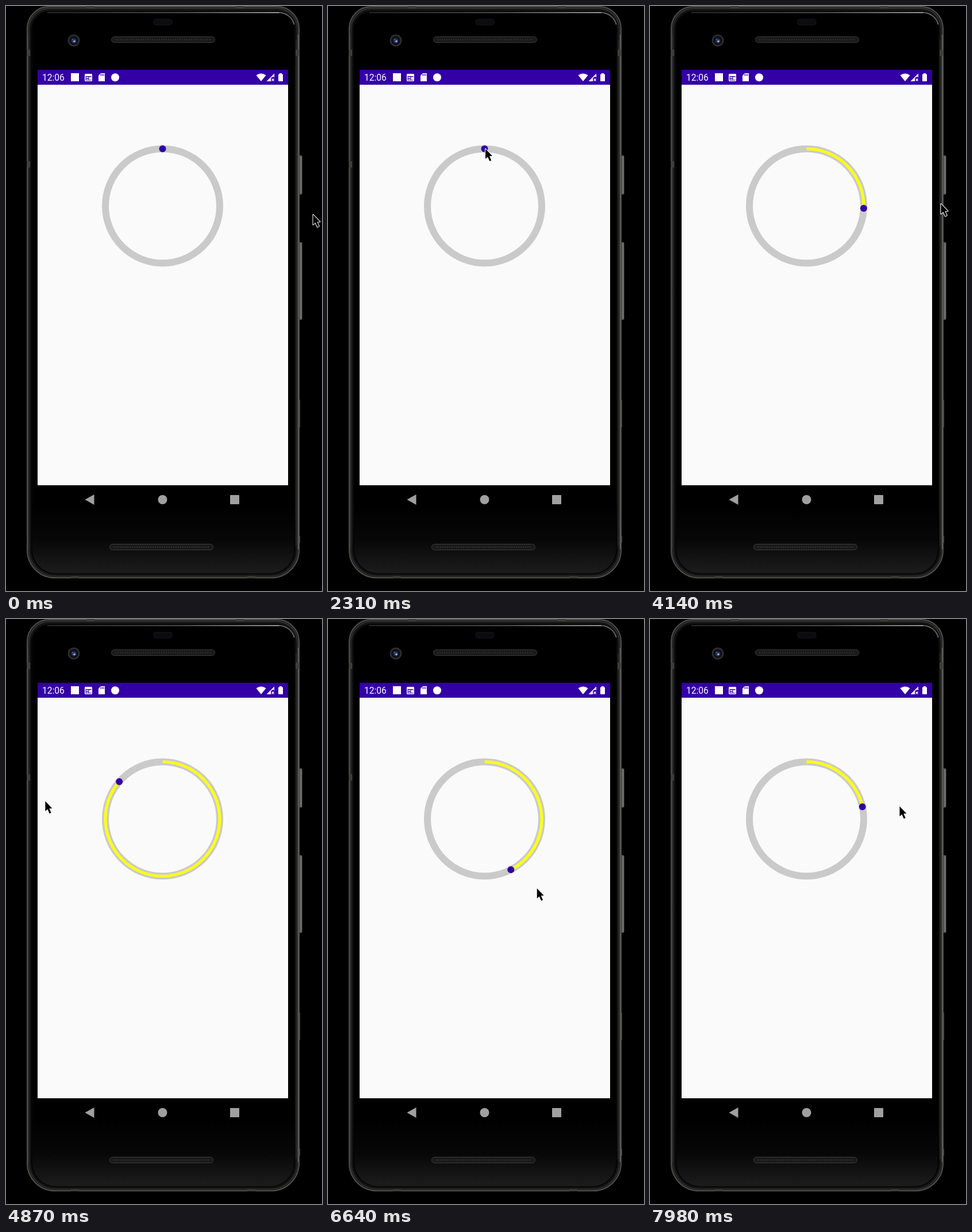
These frames come from a looping animation (550x1018 px, 8 s). An HTML page with a canvas:

```html
<!DOCTYPE html>
<html lang="en">
<head>
<meta charset="utf-8">
<title>Circular slider</title>
<style>
  html, body { margin: 0; width: 100%; height: 100%; overflow: hidden; background: #000; }
  canvas { display: block; }
</style>
</head>
<body>
<canvas id="stage" width="550" height="1018"></canvas>
<script>
const stage = document.getElementById('stage');
const backdrop = document.createElement('canvas');
backdrop.width = stage.width;
backdrop.height = stage.height;

const LOOP = 8000, LAG = 80, DRAG_START = 2350;
const RING = { x: 272.5, y: 348, r: 99.5 };
const PURPLE = '#3300a6', WHITE = '#fff';
const rad = deg => (deg - 90) * Math.PI / 180;

// Pointer before the drag: time, x, y
const approach = [
  [0, 534, 363], [220, 532, 362], [500, 440, 326], [840, 330, 284],
  [1440, 282, 260], [1800, 276, 252], [2310, 273.5, 248.5], [2350, 273.5, 248.5]
];
// Pointer during the drag: time, unwrapped clockwise degrees, distance from ring centre
const drag = [
  [2350, 0, 99.5], [2650, 88, 116], [3000, 213, 130], [3370, 325.5, 138.4],
  [3920, 445, 237], [4250, 440, 225], [4600, 380, 195], [4870, 279, 207],
  [5300, 112, 200], [5800, -40, 180], [6250, -160, 165], [6640, -216.8, 151],
  [7100, -262, 222], [7550, -298, 195], [7980, -277.8, 163], [8060, -273, 163]
];

// Smooth curve through timed pairs of values
function sample(keys, t) {
  const last = keys.length - 1;
  if (t <= keys[0][0]) return keys[0].slice(1);
  if (t >= keys[last][0]) return keys[last].slice(1);
  const i = keys.findIndex(k => k[0] > t) - 1;
  const a = keys[i], b = keys[i + 1], span = b[0] - a[0], u = (t - a[0]) / span;
  const before = keys[Math.max(0, i - 1)], after = keys[Math.min(last, i + 2)];
  return [1, 2].map(c => {
    const va = (b[c] - before[c]) / (b[0] - before[0]) * span;
    const vb = (after[c] - a[c]) / (after[0] - a[0]) * span;
    const d = b[c] - a[c];
    return a[c] + u * (va + u * (3 * d - 2 * va - vb + u * (va + vb - 2 * d)));
  });
}

function painter(canvas) {
  const ctx = canvas.getContext('2d');
  return {
    ctx,
    rect(x, y, w, h, fill) { ctx.fillStyle = fill; ctx.fillRect(x, y, w, h); },
    round(x, y, w, h, r, fill, line, width = 1) {
      ctx.beginPath();
      ctx.roundRect(x, y, w, h, r);
      if (fill) { ctx.fillStyle = fill; ctx.fill(); }
      if (line) { ctx.strokeStyle = line; ctx.lineWidth = width; ctx.stroke(); }
    },
    disc(x, y, r, fill) {
      ctx.fillStyle = fill;
      ctx.beginPath();
      ctx.arc(x, y, r, 0, 2 * Math.PI);
      ctx.fill();
    },
    poly(points, fill) {
      ctx.beginPath();
      points.forEach(p => ctx.lineTo(p[0], p[1]));
      ctx.closePath();
      if (fill) { ctx.fillStyle = fill; ctx.fill(); }
    },
    line(x1, y1, x2, y2, color, width = 1) {
      ctx.strokeStyle = color;
      ctx.lineWidth = width;
      ctx.beginPath();
      ctx.moveTo(x1, y1);
      ctx.lineTo(x2, y2);
      ctx.stroke();
    },
    gradient(x1, y1, x2, y2, stops) {
      const g = ctx.createLinearGradient(x1, y1, x2, y2);
      stops.forEach(s => g.addColorStop(s[0], s[1]));
      return g;
    }
  };
}

function drawPhone(p) {
  p.rect(0, 0, 550, 1018, '#000');
  [[260, 68], [411, 135]].forEach(([y, h]) => {
    p.round(508, y, 7.5, h, 2, '#5a5a56');
    p.line(513.5, y + 2, 513.5, y + h - 2, '#8b8b87');
  });
  [[685, 48], [922, 12]].forEach(([y, h]) => p.rect(510, y, 2, h, '#44443e'));

  const corners = [38, 38, 48, 48];
  p.round(37, 1, 473, 994, corners, '#1b1b1b', '#51514b', 2);
  p.round(40, 4, 467, 988, [36, 36, 46, 46], null, '#30302e', 2);
  p.round(42, 7, 463, 983, [34, 34, 44, 44], '#050505', '#141416', 3);
  p.round(46, 11, 455, 976, [30, 30, 41, 41],
    p.gradient(0, 870, 0, 988, [[0, '#000'], [0.5, '#070707'], [1, '#1d1d1d']]));
  p.line(72, 11.5, 476, 11.5, p.gradient(72, 0, 476, 0, [[0, '#333'], [0.6, '#666'], [1, '#c8c8c8']]), 1.5);
  p.ctx.strokeStyle = '#777';
  p.ctx.beginPath();
  p.ctx.arc(475, 39, 27.5, -Math.PI / 2, -0.25);
  p.ctx.stroke();
  p.line(505, 60, 505, 940, '#34343a');
  p.line(508.5, 50, 508.5, 945, '#60605b');
  p.line(38, 50, 38, 945, '#42423e');

  // Antenna seams
  [[36, 76], [36, 270], [504, 76]].forEach(([x, y]) => p.rect(x, y, 6, 11, '#3e3e3b'));
  [[140, 0], [400, 0], [113, 992], [420, 992]].forEach(([x, y]) => p.rect(x, y, 14, 4, '#3b3b35'));

  p.round(257, 23, 32, 10, 4, '#0b0b10', '#17171c');
  p.round(183.5, 53.5, 180, 10, 5, '#191919', '#3d3d3d');
  p.round(180.5, 936.5, 180, 10, 5, '#191919', '#3d3d3d');
  for (let x = 190; x < 358; x += 4) {
    p.rect(x, 57, 2, 3, '#2b2b2b');
    p.rect(x - 3, 940, 2, 3, '#2b2b2b');
  }
  p.disc(118, 60, 10.5, '#303033');
  p.disc(118, 60, 8, '#11111a');
  p.disc(118, 60.5, 4, '#293664');
  p.disc(119, 61.5, 1.8, '#92a9e0');
  p.disc(115.5, 58, 1, '#667');
}

function drawScreen(p) {
  const { ctx } = p;
  p.rect(55, 111, 436, 26, PURPLE);
  p.rect(55, 137, 436, 697, '#fafafa');

  ctx.fillStyle = WHITE;
  ctx.font = '15.6px Roboto, sans-serif';
  ctx.fillText('12:06', 63, 130);

  p.rect(113, 117, 14, 14, WHITE);
  p.round(137, 118, 13, 13, 1.5, WHITE);
  p.rect(138.5, 122, 10, 7.5, PURPLE);
  p.rect(139.5, 123.5, 4, 2, WHITE);
  p.rect(144.5, 123.5, 4, 5, WHITE);
  p.rect(139.5, 127, 4, 1.5, WHITE);
  p.poly([[165, 117], [172, 117], [172, 131], [161, 131], [161, 121]], WHITE);
  [165, 167.5, 170].forEach(x => p.rect(x - 0.7, 118.5, 1.3, 3, PURPLE));
  p.disc(190, 124.2, 7, WHITE);

  // Wi-Fi, mobile signal, battery
  ctx.fillStyle = WHITE;
  ctx.beginPath();
  ctx.moveTo(444, 131);
  ctx.lineTo(435.5, 120.5);
  ctx.quadraticCurveTo(444, 114.5, 452.5, 120.5);
  ctx.fill();
  p.poly([[453.5, 131], [467, 117.5], [467, 131]], WHITE);
  p.poly([[461, 131], [461, 125], [467, 122], [467, 131]], PURPLE);
  p.line(462.5, 126.5, 466.5, 130.5, WHITE, 1.2);
  p.line(466.5, 126.5, 462.5, 130.5, WHITE, 1.2);
  p.line(466.5, 118, 466.5, 124, WHITE);
  p.round(474, 118.5, 8, 12.5, 1, WHITE);
  p.rect(476, 117, 4, 2, WHITE);

  p.poly([[137.5, 859], [153.5, 850], [153.5, 868]], '#a0a0a0');
  p.disc(272.5, 859, 8, '#a0a0a0');
  p.round(390, 851, 16, 16, 1, '#a0a0a0');
}

function drawSlider(p, degrees) {
  const { ctx } = p;
  const arc = (from, to, width, color) => {
    ctx.strokeStyle = color;
    ctx.lineWidth = width;
    ctx.beginPath();
    ctx.arc(RING.x, RING.y, RING.r, rad(from), rad(to));
    ctx.stroke();
  };
  arc(0, 360, 12, '#cacaca');
  if (degrees > 0) arc(0, degrees, 5, '#fcff18');
  p.disc(RING.x + RING.r * Math.cos(rad(degrees)), RING.y + RING.r * Math.sin(rad(degrees)), 6, PURPLE);
}

function drawPointer(p, x, y) {
  const { ctx } = p;
  ctx.save();
  ctx.translate(x + 0.5, y);
  p.poly([[0, 0], [0, 17.5], [4, 14], [7.3, 21.5], [10.3, 20.2], [7, 12.8], [12, 12.5]]);
  ctx.lineJoin = 'round';
  ctx.strokeStyle = WHITE;
  ctx.lineWidth = 2;
  ctx.stroke();
  ctx.fillStyle = '#000';
  ctx.fill();
  ctx.restore();
}

function pointerAt(t) {
  if (t < DRAG_START) return sample(approach, t);
  const [angle, radius] = sample(drag, t);
  return [RING.x + radius * Math.cos(rad(angle)), RING.y + radius * Math.sin(rad(angle))];
}

const still = painter(backdrop), live = painter(stage);
drawPhone(still);
drawScreen(still);

function frame(now) {
  const t = now % LOOP;
  const angle = sample(drag, t - LAG)[0];
  live.ctx.drawImage(backdrop, 0, 0);
  drawSlider(live, ((angle % 360) + 360) % 360);
  drawPointer(live, ...pointerAt(t));
  requestAnimationFrame(frame);
}

const begin = performance.now();
const tick = () => frame(performance.now() - begin);
requestAnimationFrame(function loop() {
  live.ctx.clearRect(0, 0, 550, 1018);
  const t = (performance.now() - begin) % LOOP;
  live.ctx.drawImage(backdrop, 0, 0);
  const angle = sample(drag, t - LAG)[0];
  drawSlider(live, ((angle % 360) + 360) % 360);
  drawPointer(live, ...pointerAt(t));
  requestAnimationFrame(loop);
});
</script>
</body>
</html>
```
